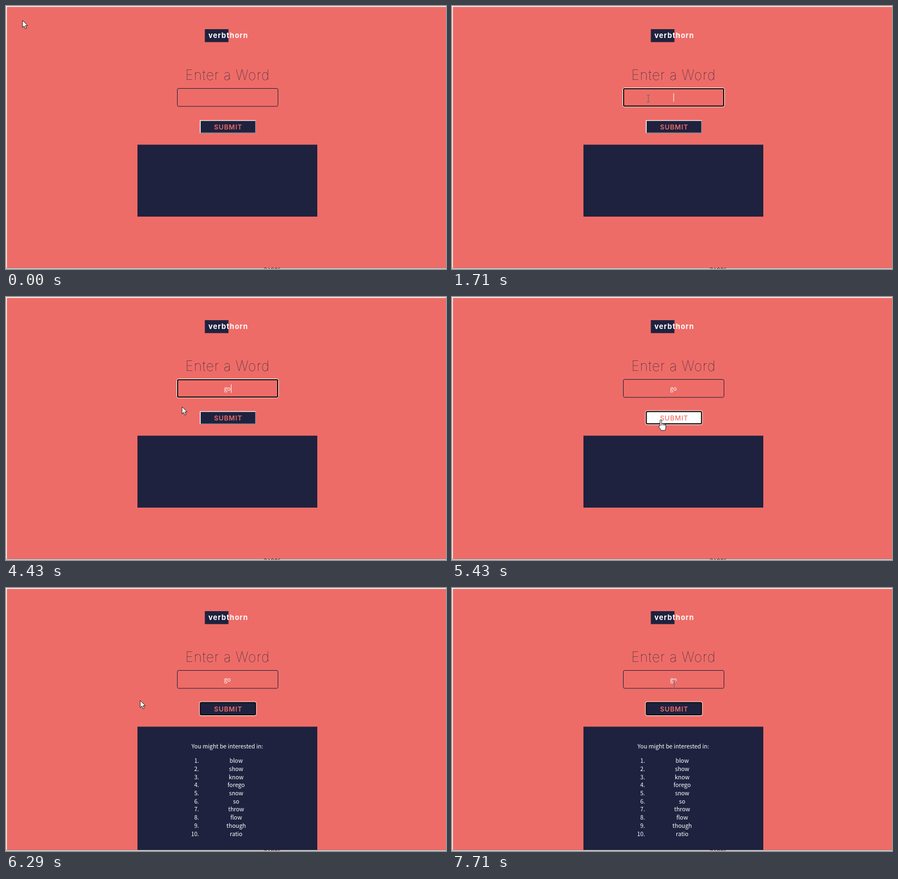
An HTML page for the animation above (8 s loop, 800 by 477 pixels).

```html
<!DOCTYPE html>
<html lang="en">
<head>
<meta charset="utf-8">
<title>Rhyme finder</title>
<style>
  html, body { margin: 0; width: 100%; height: 100%; overflow: hidden; background: #fff; }
  svg { display: block; width: 100vw; height: 100vh; }
  text { text-anchor: middle; fill: #fff; font: 10.5px "Noto Sans CJK JP", "Noto Sans CJK SC", "Noto Sans", sans-serif; }
  .ui { font-family: Inter, "Open Sans", sans-serif; }
  .logo { font-size: 13px; font-weight: 700; letter-spacing: 1px; text-anchor: start; }
  .title { font-size: 25px; font-weight: 100; letter-spacing: .85px; fill: #1e223f; }
  .submit { font-size: 12px; font-weight: 600; letter-spacing: .8px; }
  .num { text-anchor: end; }
  .ring { fill: none; stroke: #fff; }
  .arrow, .hand { fill: #fff; stroke: #222; stroke-width: 1; stroke-linejoin: round; }
  .beam { fill: none; stroke: #75686c; stroke-width: 1.2; }
</style>
</head>
<body>
<svg viewBox="0 0 800 477">
  <rect x="1.5" y="1.5" width="798.5" height="474" fill="#ee6c67"/>

  <rect x="361.5" y="42" width="43" height="23.5" fill="#1e223f"/>
  <text class="ui logo" x="368" y="58">verbthorn</text>
  <text class="ui title" x="402.8" y="134">Enter a Word</text>

  <rect id="field" x="311.5" y="149.5" width="183" height="32.5" rx="2.5" fill="none" stroke="#1e223f"/>
  <g id="fieldFocus">
    <rect class="ring" x="310.5" y="148.5" width="185" height="34.5" rx="3.5"/>
    <rect x="312" y="150" width="182" height="31.5" rx="2" fill="none" stroke="#101010" stroke-width="2"/>
  </g>
  <text id="word" x="402.5" y="170"></text>
  <rect id="caret" y="158.5" width="1" height="15" fill="#fff"/>

  <g id="plainButton">
    <rect x="352.5" y="207" width="102" height="24" fill="#8b8b90"/>
    <path d="M352.5 231V207H454.5L453 208.5H354V229.5z" fill="#f4f4f4"/>
    <rect x="354" y="208.5" width="99" height="21" fill="#1e223f"/>
  </g>
  <g id="focusButton">
    <rect class="ring" x="351.8" y="206.2" width="103.4" height="25.4" rx="3"/>
    <rect id="face" x="353.3" y="207.7" width="100.4" height="22.4" rx="2" stroke="#101010" stroke-width="2"/>
  </g>
  <text id="submit" class="ui submit" x="404" y="224">SUBMIT</text>

  <rect id="panel" x="239" y="251.5" width="327" fill="#1e223f"/>
  <g id="results"><text x="402.3" y="291">You might be interested in:</text></g>

  <path d="M0 475.7H800" stroke="#858585"/>
  <path d="M469 475.5q3-1.5 5 1M477 474.5l2 2.5M482 477l2.5-2.5 2 2.5M489 477l2-2.5 2 2.5M495 476.5l3-2" fill="none" stroke="#2a1c20"/>

  <g id="cursor">
    <path class="arrow" d="M0 0v13l3-2.8 2.2 5 2.2-1-2.2-4.8h4.2z"/>
    <path class="beam" d="M-3-6.5H-1L0-5.5 1-6.5H3M0-5.5V5.5M-3 6.5H-1L0 5.5 1 6.5H3"/>
    <g class="hand">
      <path d="M-1.8 11V1.2a1.5 1.5 0 0 1 3 0V7q1.5-1.3 3 .3 1.6-1 2.6.6 2-.4 2 1.6V14q0 2-1.5 5H0q-1-3-4-6-1-2.5 2.2-2z"/>
      <path d="M1.2 7v3M4.2 7.3v2.7M6.8 8v2.4" fill="none"/>
    </g>
  </g>
</svg>
<script>
const LOOP = 8000;
const $ = id => document.getElementById(id);
const show = (node, on) => node.setAttribute("visibility", on ? "visible" : "hidden");

// Pointer stops: start time, x, y, shape
const stops = [
  [0, 30, 26, "arrow"], [140, 190, 96, "arrow"], [290, 360.5, 177, "beam"],
  [710, 367, 172, "beam"], [860, 370, 168, "beam"], [1000, 364, 168, "beam"],
  [1710, 357, 168, "beam"], [1860, 106, 146, "arrow"],
  [3860, 170, 164, "arrow"], [4000, 282, 193, "arrow"], [4140, 325, 199, "arrow"],
  [4430, 320, 199, "arrow"], [4570, 345, 211, "arrow"], [4710, 374, 221, "hand"],
  [4860, 380, 223, "hand"], [6000, 358, 221, "hand"], [6140, 276, 209, "arrow"],
  [6290, 244, 204, "arrow"], [6430, 247, 204, "arrow"], [6570, 272, 200, "arrow"],
  [6710, 322, 193, "arrow"], [6860, 372, 187, "arrow"], [7000, 400, 181, "beam"],
  [7290, 401, 180, "beam"], [7430, 402, 178, "beam"], [7570, 403, 176, "beam"],
  [7710, 404, 175, "beam"]
];
const words = [[0, "", 402.5], [2710, "g", 405.5], [3000, "go", 409]];
const caretOn = [[1290, 1860], [2290, 3570], [4140, 4570], [5140, 5430]];
const at = (list, t) => list.filter(item => item[0] <= t).pop();

function addText(x, y, str, cls = "") {
  const node = document.createElementNS("http://www.w3.org/2000/svg", "text");
  node.setAttribute("x", x);
  node.setAttribute("y", y);
  node.setAttribute("class", cls);
  node.textContent = str;
  $("results").append(node);
}
"blow show know forego snow so throw flow though ratio".split(" ").forEach((rhyme, i) => {
  const y = 317.2 + 14.7 * i;
  addText(351, y, `${i + 1}.`, "num");
  addText(418.5, y, rhyme);
});

function draw(t) {
  const [, x, y, shape] = at(stops, t);
  const [, typed, caretX] = at(words, t);
  const focused = t >= 1290 && t < 5430;
  const clicked = t >= 5430;
  const pressed = clicked && t < 5570;
  const done = t >= 5570;

  $("cursor").setAttribute("transform", `translate(${x} ${y})`);
  for (const node of $("cursor").children) show(node, node.classList.contains(shape));

  show($("field"), !focused);
  show($("fieldFocus"), focused);
  $("word").textContent = typed;
  $("caret").setAttribute("x", caretX);
  show($("caret"), caretOn.some(([from, to]) => t >= from && t < to));

  show($("plainButton"), !clicked);
  show($("focusButton"), clicked);
  $("face").setAttribute("fill", pressed ? "#fff" : "#1e223f");
  $("submit").style.fill = shape === "hand" && !pressed ? "#fff" : "#ee6c67";
  $("submit").style.fontWeight = pressed ? 500 : 600;

  $("panel").setAttribute("height", done ? 223.7 : 130.5);
  show($("results"), done);
}

function tick() {
  draw(performance.now() % LOOP);
  requestAnimationFrame(tick);
}
tick();
</script>
</body>
</html>
```
